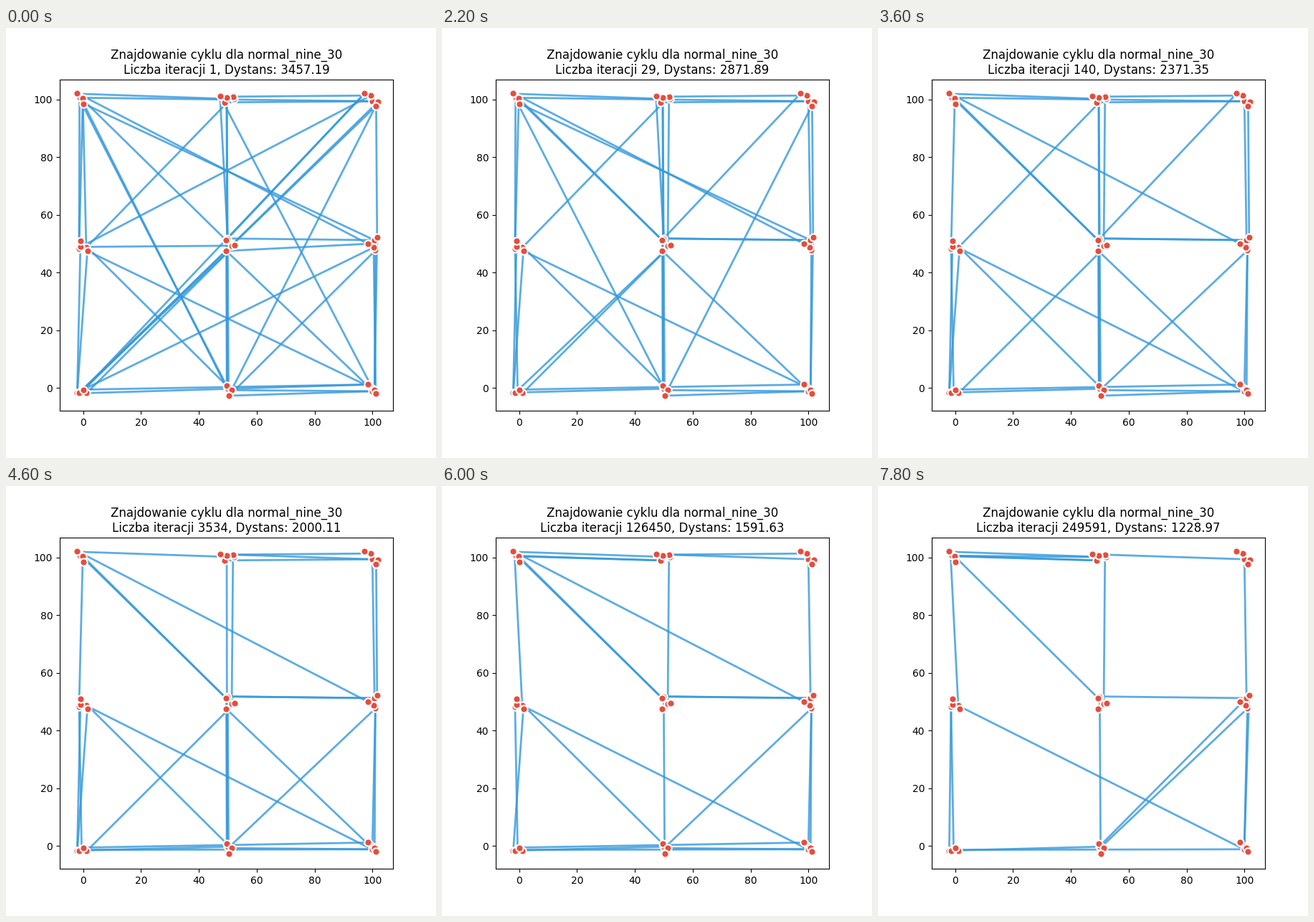
These frames come from a looping animation (600 px wide and 600 px high, 8 s). A matplotlib script:

```python
import random

import matplotlib.pyplot as plt
import numpy as np
from matplotlib.animation import FuncAnimation
from matplotlib.collections import LineCollection

FRAMES, STEP = 40, 200
PER_NODE = 5
BLUE, RED = "#3498db", "#e74c3c"

# Closed walks over a 3 x 3 grid of nodes, numbered 1 to 9 row by row from the top.
START = [1, 2, 2, 3, 1, 4, 1, 4, 2, 3, 4, 5, 1, 8, 2, 8, 1, 6, 5, 2, 9, 4, 7,
         4, 8, 5, 3, 7, 3, 8, 9, 8, 6, 9, 6, 3, 7, 5, 7, 9, 7, 6, 9, 5, 6]
END = [1, 2, 1, 2, 1, 5, 2, 3, 6, 5, 8, 6, 9, 6, 8, 7, 4, 7, 9, 4]

# Progress of the two counters
TIMES = [0, 5, 11, 18, 23, 30, 39]
ITERATIONS = [1, 13, 29, 140, 3534, 126450, 249591]
DISTANCES = [3457.19, 3177.66, 2871.89, 2371.35, 2000.11, 1591.63, 1228.97]

nodes = [(x, y) for y in (100, 50, 0) for x in (0, 50, 100)]
spread = np.random.RandomState(30).normal(0, 1.3, (9, PER_NODE, 2)).clip(-2.7, 2.7)
cities = np.array(nodes)[:, None, :] + spread


def roads(walk, rng):
    """Links of a walk in shuffled order; each visit to a node takes its next city."""
    visits = [0] * 9
    stops = []
    for node in walk:
        stops.append(cities[node - 1, visits[node - 1] % PER_NODE])
        visits[node - 1] += 1
    links = list(zip(stops, stops[1:] + stops[:1]))
    rng.shuffle(links)
    return links


rng = random.Random(9)
old, new = roads(START, rng), roads(END, rng)

fig, ax = plt.subplots(figsize=(6, 6), dpi=100)
ax.set_xlim(-8.1, 107.11)
ax.set_ylim(-7.9, 106.9)
title = ax.set_title("")
lines = ax.add_collection(
    LineCollection([], colors=BLUE, linewidths=2, alpha=.8, zorder=2), autolim=False)
ax.scatter(*cities.reshape(-1, 2).T, s=54, c=RED, edgecolors="white",
           linewidths=1.5, zorder=3)


def draw(i):
    iteration = round(np.exp(np.interp(i, TIMES, np.log(ITERATIONS))))
    distance = np.interp(i, TIMES, DISTANCES)
    title.set_text("Znajdowanie cyklu dla normal_nine_30\n"
                   f"Liczba iteracji {iteration}, Dystans: {distance:.2f}")
    # Roads of the first tour give way one by one to those of the last.
    t = i / (FRAMES - 1)
    lines.set_segments(old[round(t * len(old)):] + new[:round(t * len(new))])
    return lines, title


anim = FuncAnimation(fig, draw, frames=FRAMES, interval=STEP, repeat=True,
                     repeat_delay=0, blit=False)
plt.show()
```
